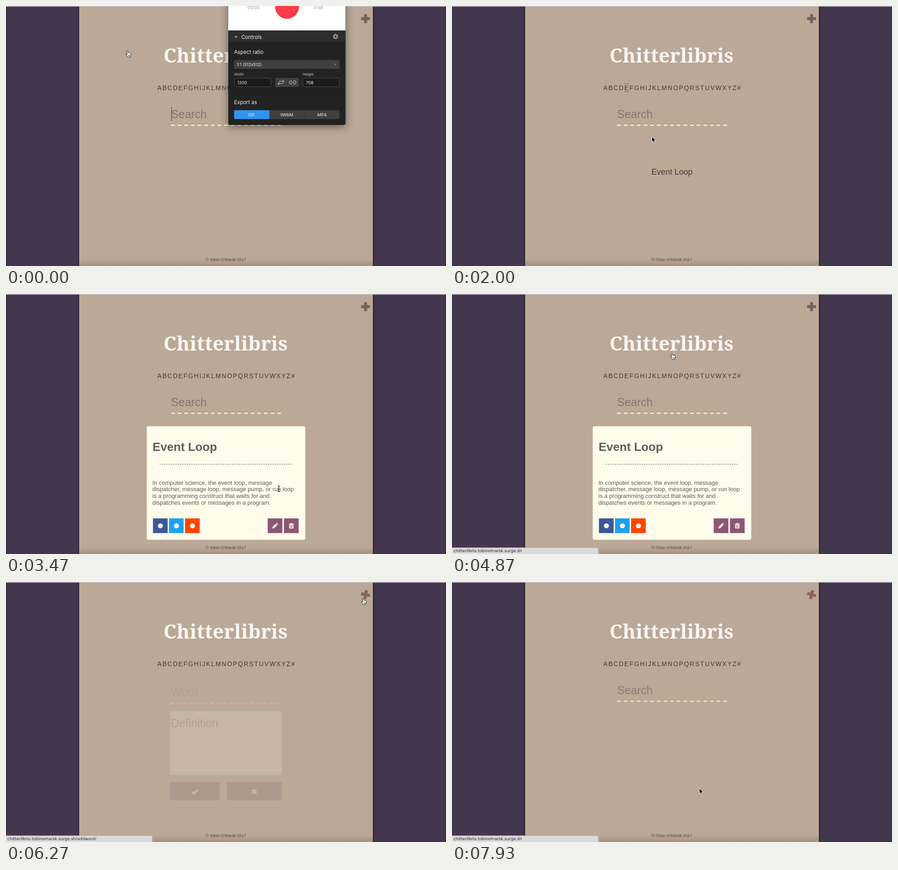
Recreate the animation shown at these times as an HTML page. Size 974 by 575 pixels, loop 8000 ms.

```html
<!DOCTYPE html>
<html lang="en">
<head>
<meta charset="utf-8">
<title>Chitterlibris</title>
<style>
  html, body { margin: 0; width: 100%; height: 100%; overflow: hidden; background: #44364f; }
  svg { display: block; width: 100%; height: 100%; font-family: "Liberation Sans", Arial, sans-serif; }
  .column { fill: #bba897; filter: drop-shadow(0 0 3px rgba(0,0,0,.5)); }
  .title { font: 700 43.6px "Noto Serif", serif; fill: #f8f6f4; }
  .letters { font-size: 14px; letter-spacing: 1.92px; fill: #453a38; }
  .field { font-size: 25px; fill: #85776c; }
  .dashes { stroke: #fdf6c0; stroke-width: 2.4; stroke-dasharray: 8.2 6.48; }
  .card { fill: #fffcec; }
  .rule { stroke: #67605b; stroke-dasharray: 3 2; }
  .body { font-size: 13px; fill: #5f5855; }
  .plum { fill: #8d5675; }
  .dim { fill: #6b5c64; }
  .faint { opacity: .4; }
  .url { font: 9px "DejaVu Sans", sans-serif; fill: #262329; }
  #panel { font-family: Inter, sans-serif; fill: #f2f2f2; }
  .head { font-size: 11.4px; }
  .small { font-size: 9.4px; }
  .tiny { font-size: 7.8px; fill: #c8c8c8; }
  .grey { fill: #404040; }
  .input { fill: #1b1b1b; stroke: #4a4a4a; }
  .mid { text-anchor: middle; }
  .line { fill: none; stroke: #a5a5a5; stroke-width: 1.4; }
  .white { fill: #fffcf0; }
</style>
</head>
<body>
<svg viewBox="0 0 974 575" preserveAspectRatio="none">
  <defs>
    <linearGradient id="floor" x2="0" y2="1">
      <stop stop-color="#705d50" stop-opacity="0"/>
      <stop offset="1" stop-color="#705d50" stop-opacity=".3"/>
    </linearGradient>
    <g id="share">
      <path fill="#3b5998" d="M0 0h32.5v32.5h-32.5z"/>
      <path fill="#1da1f2" d="M35.5 0h32.5v32.5h-32.5z"/>
      <path fill="#ff4500" d="M71 0h32.5v32.5h-32.5z"/>
      <g class="white">
        <circle cx="16.5" cy="16.5" r="5.5"/>
        <circle cx="52" cy="16.5" r="5.5"/>
        <circle cx="87.5" cy="16.5" r="5.5"/>
      </g>
    </g>
    <g id="edit">
      <path d="M0 0h32.5v32.5h-32.5zM36 0h32.5v32.5h-32.5z"/>
      <path class="white" d="M10 22.5l1-4 6.8-6.8 3.2 3.2-6.8 6.8zM18.6 10.9l1.2-1.2 3.2 3.2-1.2 1.2z"/>
      <path class="white" d="M46.5 12h3.2l.8-1.7h3.6l.8 1.7h3.2v1.5h-11.6zM47.5 14.3h9.6v8h-9.6z"/>
      <path d="M49.6 15.5h1v5.5h-1zM51.8 15.5h1v5.5h-1zM54 15.5h1v5.5h-1z"/>
    </g>
  </defs>

  <rect width="974" height="575" fill="#44364f"/>
  <rect class="column" x="162" y="-10" width="650" height="595"/>
  <rect x="162" y="560" width="650" height="15" fill="url(#floor)"/>
  <path fill="#332a3b" d="M0 0h1v575h-1zM973 0h1v575h-1z"/>
  <path fill="#d3cfd4" d="M0 0h974v1.2h-974z"/>

  <text class="title" x="348.5" y="125">Chitterlibris</text>
  <text class="letters" x="335" y="185.5">ABCDEFGHIJKLMNOPQRSTUVWXYZ#</text>
  <path id="mark" stroke="#6d5d55" d="M381 172.5h10M381 189.5h10"/>
  <text x="486.5" y="563.5" font-size="9.1" fill="#4a403c" class="mid">© Tobin O'Marsk 2017</text>
  <path id="plus" d="M-3.2-8.8q0-1.2 1.2-1.2h4q1.2 0 1.2 1.2v5.6h5.6q1.2 0 1.2 1.2v4q0 1.2-1.2 1.2h-5.6v5.6q0 1.2-1.2 1.2h-4q-1.2 0-1.2-1.2v-5.6h-5.6q-1.2 0-1.2-1.2v-4q0-1.2 1.2-1.2h5.6z"/>

  <g id="search">
    <text class="field" x="365.3" y="248">Search</text>
    <path class="dashes" d="M365.5 263.8h243.5"/>
    <path id="caret" stroke="#3e3633" d="M366.5 223.5v31"/>
  </g>

  <text id="list" class="mid" x="487" y="373" font-size="18" fill="#453a38">Event Loop</text>

  <g id="preview">
    <g class="faint">
      <rect class="card" x="353" y="293" width="269" height="151" rx="4"/>
      <path class="rule faint" d="M375 348.5h225"/>
      <text class="body" x="366" y="378">undefined</text>
    </g>
    <use href="#share" x="366" y="396.5"/>
    <use href="#edit" class="dim" x="539.5" y="396.5"/>
  </g>

  <g id="entry">
    <rect class="card" x="311.5" y="292.5" width="351" height="251" rx="4"/>
    <text x="324.5" y="347" font-size="26.2" font-weight="700" fill="#625c58">Event Loop</text>
    <path class="rule" d="M340 376.5h294"/>
    <g class="body">
      <text x="324" y="421.5">In computer science, the event loop, message</text>
      <text x="324" y="436.3">dispatcher, message loop, message pump, or run loop</text>
      <text x="324" y="451">is a programming construct that waits for and</text>
      <text x="324" y="465.5">dispatches events or messages in a program.</text>
    </g>
    <use href="#share" x="325.3" y="496.2"/>
    <use href="#edit" class="plum" x="579.3" y="496.2"/>
  </g>

  <g id="form">
    <text class="field" x="365.3" y="251.5">Word</text>
    <path class="dashes" d="M363 269h247"/>
    <rect class="card" x="363.5" y="286" width="247" height="141" rx="4"/>
    <path stroke="#aaa" d="M604 426l5-5M607 426l2-2"/>
    <text class="field" x="365.3" y="321">Definition</text>
    <path class="dim" d="M363 443h110v40h-110zM488.5 443h122v40h-122z"/>
    <path fill="none" stroke="#fffcf0" stroke-width="4" d="M411 463.5l5 5 9-9.5M544.5 459l10 10m0-10l-10 10"/>
  </g>

  <g id="status">
    <path fill="#dcdadc" stroke="#a9a5ab" stroke-width=".8" d="M-1 561h322q3 0 3 3v12h-325z"/>
    <text id="url" class="url" x="3" y="571"></text>
  </g>

  <g id="panel">
    <path fill="#222" style="filter:drop-shadow(0 4px 9px rgba(0,0,0,.45))" d="M492 -20h259.5v279q0 4-4 4h-251.5q-4 0-4-4z"/>
    <path fill="#fff" d="M492 0h259.5v54h-259.5z"/>
    <path fill="#2d2d2d" d="M492 54h259.5v26h-259.5z"/>
    <circle cx="622" cy="2" r="26.3" fill="#ff3b47"/>
    <g class="small mid" fill="#999"><text x="548" y="6.5">00:00</text><text x="692" y="6.5">0 kB</text></g>
    <path fill="#999" d="M505 69.5l4-4 4 4z"/>
    <circle cx="729.5" cy="67.5" r="3.6" fill="none" stroke="#8d8d8d" stroke-width="3"/>
    <circle cx="729.5" cy="67.5" r="5.3" fill="none" stroke="#8d8d8d" stroke-width="1.8" stroke-dasharray="2.8 2.75"/>
    <g class="head">
      <text x="521" y="72.5">Controls</text>
      <text x="505" y="105.5">Aspect ratio</text>
      <text x="505" y="217">Export as</text>
    </g>
    <rect class="grey" x="505" y="119.5" width="233.5" height="19.5" rx="2"/>
    <path fill="#aaa" d="M727 128h4l-2 2.5z"/>
    <text class="tiny" x="505" y="153.5">Width</text>
    <text class="tiny" x="657" y="153.5">Height</text>
    <rect class="input" x="505.5" y="159.5" width="81" height="19" rx="2"/>
    <rect class="input" x="657" y="159.5" width="81" height="19" rx="2"/>
    <rect class="grey" x="596" y="159" width="52" height="20" rx="2"/>
    <path class="line" d="M604 166.5h11m-3-3l3 3-3 3M613 171.5h-11m3-3l-3 3 3 3M633 165.5h-2.5a3.5 3.5 0 0 0 0 7h2.5M636 165.5h2.5a3.5 3.5 0 0 1 0 7h-2.5M631 169h7"/>
    <path stroke="#181818" d="M492 192.5h259"/>
    <rect class="grey" x="505" y="230.5" width="233.5" height="19.5" rx="2"/>
    <path fill="#2f94f1" d="M507 230.5h76v19.5h-76q-2 0-2-2v-15.5q0-2 2-2z"/>
    <path stroke="#353535" d="M660.5 231v19"/>
    <g class="small">
      <text x="511" y="132.5">1:1 (512x512)</text>
      <text x="512" y="173">1200</text>
      <text x="664" y="173">708</text>
      <g class="mid"><text x="543.5" y="243.8">GIF</text><text x="621.5" y="243.8">WebM</text><text x="699.5" y="243.8">MP4</text></g>
    </g>
  </g>

  <g id="cursor">
    <g id="hand" stroke="#111" stroke-linejoin="round">
      <path fill="#fff" d="M-3.7-5.5C-3.7-7.3-1.4-7.4-1-5.7L-.3-2.4C.2-3.4 1.7-3.1 1.9-2C2.5-2.7 3.8-2.3 3.9-1.3C4.7-1.8 5.7-1.1 5.6 0L5.2 3.3L4.1 6.8H-1.2L-5 1.7C-6 .2-4.4-.8-3.2.5L-2.5 1.3Z"/>
      <path stroke-width=".7" d="M-.2 2v2.8M1.5 2v2.8M3.2 2v2.8"/>
    </g>
    <path id="arrow" fill="#000" stroke="#fff" d="M-.5-7v12.2l2.8-2.6 2.1 4.6 2-.9-2-4.4h3.9z"/>
    <path id="beam" fill="none" stroke="#222" stroke-width="1.2" d="M-3-6.5q3 0 3 2v9q0 2-3 2M3-6.5q-3 0-3 2v9q0 2 3 2M-2 1.5h4"/>
  </g>
</svg>
<script>
const LOOP = 8000;
const $ = id => document.getElementById(id);
const site = 'chitterlibris.tobinomarsk.surge.sh';
const mix = (a, b, k) => a + (b - a) * k;
const smooth = k => k * k * (3 - 2 * k);

// keys: [time, value, ...]; values may be several numbers
function track(keys, t, ease = k => k) {
  const i = keys.findIndex(key => key[0] > t);
  if (i < 0) return keys[keys.length - 1].slice(1);
  if (i === 0) return keys[0].slice(1);
  const [t0, ...a] = keys[i - 1], [t1, ...b] = keys[i];
  return a.map((v, n) => mix(v, b[n], ease((t - t0) / (t1 - t0))));
}
// latest value whose time has come
const step = (keys, t) => keys.filter(key => key[0] <= t).pop()[1];

const fades = {
  panel: [[70, 1], [200, 0]],
  mark: [[1150, 0], [1350, 1], [2750, 1], [2870, .4], [3050, 0]],
  search: [[6130, 1], [6230, 0], [7800, 0], [7930, .85], [8000, 1]],
  list: [[1480, 0], [1750, 1], [2650, 1], [2780, 0]],
  preview: [[2820, 0], [2870, .13], [2950, .35], [2951, 0]],
  entry: [[2950, 0], [2951, .35], [3200, 1], [5050, 1], [5200, 0]],
  form: [[6220, 0], [6270, .17], [6520, 1], [7680, 1], [7800, 0]]
};
const path = [
  [70, 271, 106], [850, 394, 188], [1050, 394, 188], [1280, 387, 187], [1550, 387, 187],
  [2350, 481, 370], [2900, 481, 370], [3350, 604, 431], [4350, 604, 431],
  [4800, 489, 138], [5150, 489, 138], [5900, 792, 43], [6450, 792, 43],
  [7300, 548, 463]
];
const pointers = [
  [0, 'hand'], [200, 'arrow'], [700, 'hand'], [1650, 'arrow'], [2200, 'hand'], [2780, 'arrow'],
  [3200, 'beam'], [4450, 'arrow'], [4730, 'hand'], [5250, 'arrow'], [5800, 'hand'],
  [6550, 'arrow'], [7200, 'hand'], [7800, 'arrow']
];
const links = [
  [0, ''], [750, '/browse/f'], [1200, '/browse/e'], [1850, ''], [2200, '/entries/307-event-loop'],
  [3250, ''], [4730, '/'], [5450, ''], [5800, '/addword/'], [6750, ''], [7200, '/']
];
const turn = [[6170, 0], [6270, 10], [6500, 45], [7750, 45], [7930, 15], [8000, 7]];

function draw(now) {
  const t = now % LOOP;
  for (const id in fades) $(id).style.opacity = track(fades[id], t)[0];

  $('caret').style.opacity = t < 1400 && t % 1000 < 530 ? 1 : 0;

  const [angle] = track(turn, t);
  const k = angle / 45;
  $('plus').setAttribute('transform', `translate(796 28) rotate(${angle})`);
  $('plus').style.fill = `rgb(${mix(113, 185, k)},${mix(101, 95, k)},${mix(94, 85, k)})`;

  const link = step(links, t);
  $('status').style.display = link ? '' : 'none';
  $('url').textContent = site + (link === '/' ? '' : link);

  $('cursor').setAttribute('transform', `translate(${track(path, t, smooth)})`);
  const pointer = step(pointers, t);
  for (const id of ['hand', 'arrow', 'beam'])
    $(id).style.display = pointer === id ? '' : 'none';
}

const start = performance.now();
function frame() {
  draw(performance.now() - start);
  requestAnimationFrame(frame);
}
frame();
</script>
</body>
</html>
```
